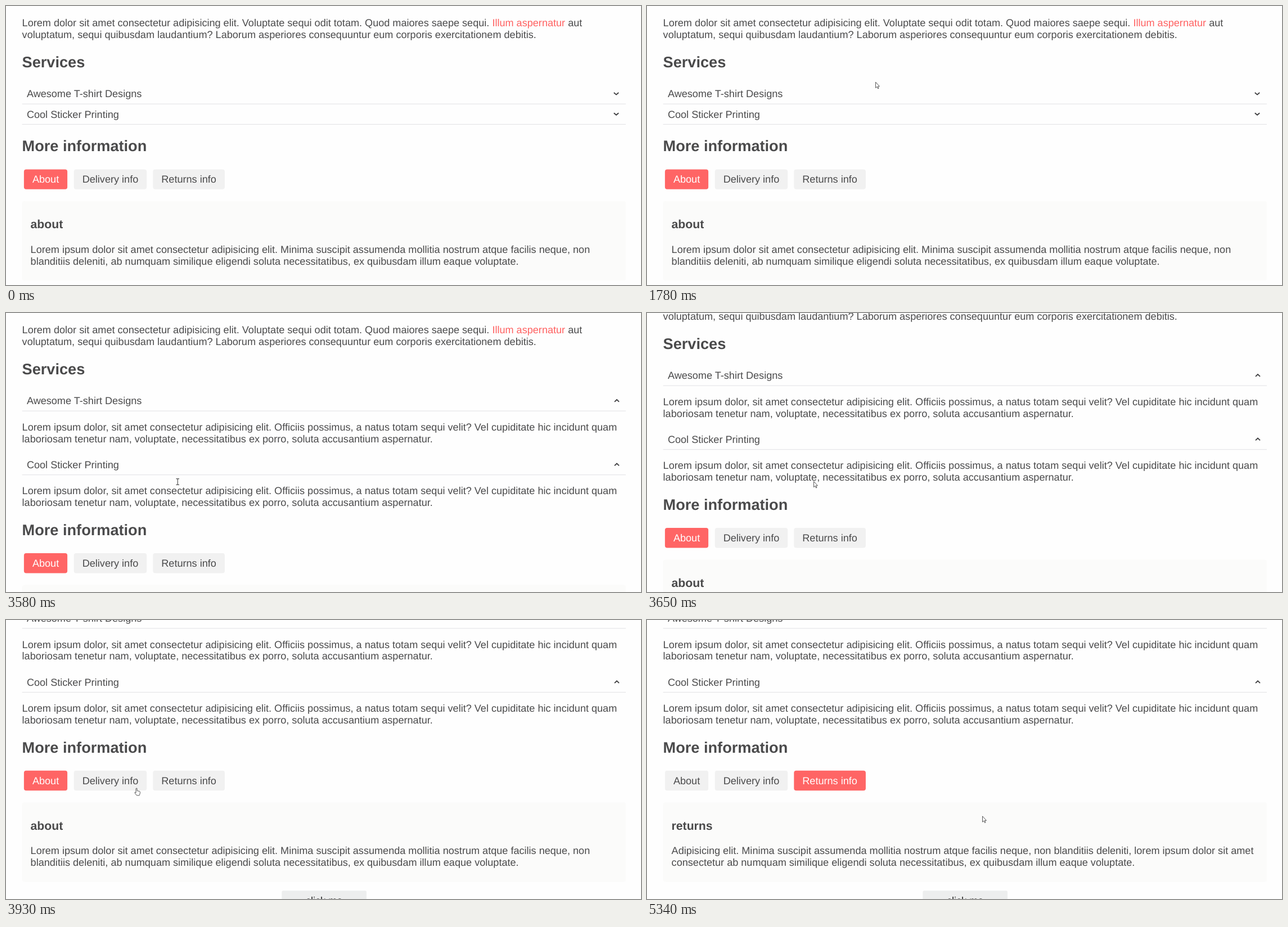
Recreate the animation shown at these times as an HTML page. Size 1129 by 496 pixels, loop 5.41 s.

```html
<!DOCTYPE html>
<html lang="en">
<head>
<meta charset="utf-8">
<title>Services and information</title>
<style>
  html, body { margin: 0; width: 100%; height: 100%; overflow: hidden; background: #fefefe; }
  svg { display: block; width: 1129px; height: 496px; }
  text {
    font: 18.1px "Liberation Sans", Arial, sans-serif;
    fill: #4a4a4b;
    text-rendering: geometricPrecision;
  }
  .h2 { font-size: 27.15px; font-weight: bold; }
  .h3 { font-size: 21.18px; font-weight: bold; }
  .link { fill: #ff6060; }
  .rule { fill: #e2e2e4; }
  .panel { fill: #fbfbfa; }
  .tab rect { fill: #f1f1f1; }
  .tab.on rect { fill: #ff6565; }
  .tab.on text { fill: #fff; }
  .chevron { fill: none; stroke: #3c3c3e; stroke-width: 1.8; }
  .pointer path { fill: #fff; stroke: #444; stroke-width: .9; stroke-linejoin: round; }
  .pointer .beam { fill: none; stroke-width: 1.1; }
</style>
</head>
<body>
<svg id="stage" viewBox="0 0 1129 496"></svg>
<script>
const LOOP = 5410;
const LEFT = 28.6, INNER = 43.6, LEADING = 20.8;

const text = (x, y, content, cls = '') => `<text x="${x}" y="${y}" class="${cls}">${content}</text>`;
const lines = (x, y, list) => list.map((line, i) => text(x, y + i * LEADING, line)).join('');
const group = (id, content) => `<g id="${id}">${content}</g>`;

const header = (id, y, label) =>
  text(36.9, y, label) +
  `<path id="${id}" class="chevron"/>` +
  `<rect class="rule" x="28.6" y="${y + 11.2}" width="1073.4" height="1"/>`;

const tab = (x, width, label) =>
  `<g class="tab"><rect x="${x}" y="290.4" width="${width}" height="35.4" rx="4"/>${text(x + 15, 314.4, label)}</g>`;

const panel = (title, list) =>
  `<g class="copy">${text(INNER, 395.4, title, 'h3')}${lines(INNER, 438.8, list)}</g>`;

const answer = [
  'Lorem ipsum dolor, sit amet consectetur adipisicing elit. Officiis possimus, a natus totam sequi velit? Vel cupiditate hic incidunt quam',
  'laboriosam tenetur nam, voluptate, necessitatibus ex porro, soluta accusantium aspernatur.'
];

const stage = document.getElementById('stage');
stage.innerHTML =
  group('page',
    lines(LEFT, 36.3, [
      'Lorem dolor sit amet consectetur adipisicing elit. Voluptate sequi odit totam. Quod maiores saepe sequi. <tspan class="link">Illum aspernatur</tspan> aut',
      'voluptatum, sequi quibusdam laudantium? Laborum asperiores consequuntur eum corporis exercitationem debitis.'
    ]) +
    text(LEFT, 108.7, 'Services', 'h2') +
    header('chevron1', 162.4, 'Awesome T-shirt Designs') +
    group('answer1', lines(LEFT, 208.8, answer)) +
    group('second', header('chevron2', 198.7, 'Cool Sticker Printing')) +
    group('answer2', lines(LEFT, 322.2, answer)) +
    group('more',
      text(LEFT, 258.3, 'More information', 'h2') +
      tab(31.9, 77.2, 'About') + tab(120.7, 129.5, 'Delivery info') + tab(261.3, 127.6, 'Returns info') +
      '<rect class="panel" x="28.6" y="346.8" width="1073.4" height="141.4" rx="4"/>' +
      panel('about', [
        'Lorem ipsum dolor sit amet consectetur adipisicing elit. Minima suscipit assumenda mollitia nostrum atque facilis neque, non',
        'blanditiis deleniti, ab numquam similique eligendi soluta necessitatibus, ex quibusdam illum eaque voluptate.'
      ]) +
      panel('delivery', [
        'Non blanditiis deleniti, ab numquam similique eligendi soluta necessitatibus, ex quibusdam illum eaque voluptate.Lorem ipsum',
        'dolor sit amet consectetur adipisicing elit. Minima suscipit assumenda mollitia nostrum atque facilis neque.'
      ]) +
      panel('returns', [
        'Adipisicing elit. Minima suscipit assumenda mollitia nostrum atque facilis neque, non blanditiis deleniti, lorem ipsum dolor sit amet',
        'consectetur ab numquam similique eligendi soluta necessitatibus, ex quibusdam illum eaque voluptate.'
      ]) +
      '<rect x="490.3" y="503.8" width="150.7" height="35" rx="2.5" fill="#edeeee"/>' +
      '<text x="565.6" y="527.5" text-anchor="middle" style="fill:#222">click me</text>'
    )
  ) +
  '<path id="tip" d="M873 0H986V12H934.5L929.5 17L924.5 12H873Z" fill="#444"/>' +
  '<g id="pointer" class="pointer">' +
    '<path d="M.5 .3V10.6L2.9 8.4L4.5 12L6 11.3L4.5 7.9H7.4Z"/>' +
    '<path d="M3 1.3q1-1.3 2 0v4l4.2.9q1.3.4 1.2 1.8l-.5 3.2-1 2.4H4.4L1 9.2Q.4 7.8 2 8l1 .8z"/>' +
    '<path class="beam" d="M.5 .6H2.4L3.2 1.2L4 .6H5.9M3.2 1V11M.5 11.4H2.4L3.2 10.8L4 11.4H5.9"/>' +
  '</g>';

const $ = id => document.getElementById(id);
const tabs = [...stage.querySelectorAll('.tab')];
const copies = [...stage.querySelectorAll('.copy')];
const shapes = [...$('pointer').children];

const ARROW = 0, HAND = 1, BEAM = 2;
// time, left, top, shape
const pointerKeys = [
  [70, 945, 90, ARROW], [280, 938, 62, ARROW], [490, 926, 30, HAND], [560, 924, 27, HAND],
  [1290, 924, 27, HAND], [1360, 912, 32, HAND], [1430, 870, 45, ARROW], [1570, 660, 88, ARROW],
  [1710, 462, 126, ARROW], [1780, 406, 135, ARROW], [1850, 378, 142, HAND], [1990, 358, 156, HAND],
  [2190, 353, 164, HAND], [2330, 353, 164, HAND], [2470, 349, 178, ARROW], [2530, 345, 197, BEAM],
  [2740, 335.3, 235, ARROW], [2810, 319, 268, HAND], [2960, 315, 282, HAND], [3160, 315, 282, HAND],
  [3400, 309, 284, HAND], [3510, 304, 292, BEAM], [3580, 302, 294, BEAM], [3650, 296, 299, ARROW],
  [3790, 280.3, 311.5, ARROW], [3860, 255, 306, HAND], [4060, 178, 284, HAND], [4200, 165.5, 280, HAND],
  [4600, 165.5, 280, HAND], [4810, 318, 281, HAND], [4940, 318, 281, HAND], [5080, 385, 300, ARROW],
  [5340, 596, 348.5, ARROW]
];
const scrollKeys = [[3580, 0], [3650, 45], [3720, 95], [3790, 126.3], [3860, 148], [3930, 159.2]];
const tipKeys = [[350, 0], [700, 1], [1360, 1], [1710, 0]];

const stepStarts = [0, 1360, 2330, 2600, 3160, 4200, 4530, 4940, 5340];
function snap(t) {
  const start = stepStarts.findLast(s => s <= t);
  return start + Math.floor((t - start) / 70) * 70;
}

function sample(keys, t) {
  const next = keys.findIndex(key => key[0] > t);
  if (next === 0) return keys[0];
  if (next < 0) return keys[keys.length - 1];
  const a = keys[next - 1], b = keys[next];
  const k = (t - a[0]) / (b[0] - a[0]);
  return a.map((v, i) => v + (b[i] - v) * k);
}

const move = (id, x, y) => $(id).setAttribute('transform', `translate(${x} ${y})`);
const show = (node, on) => { node.style.display = on ? '' : 'none'; };

function setChevron(id, y, open) {
  $(id).setAttribute('d', open ? `M1082 ${y + 2}L1086 ${y - 1.8}L1090 ${y + 2}`
                               : `M1080.8 ${y - 1.8}L1085 ${y + 1.8}L1089.2 ${y - 1.8}`);
}

function render(time) {
  const t = snap(time);
  const firstOpen = t >= 2330, secondOpen = t >= 3160;
  const active = t >= 4940 ? 2 : t >= 4410 ? 1 : 0;

  move('page', 0, -sample(scrollKeys, t)[1]);
  move('second', 0, firstOpen ? 77.3 : 0);
  move('more', 0, secondOpen ? 136.6 : firstOpen ? 77.3 : 0);
  show($('answer1'), firstOpen);
  show($('answer2'), secondOpen);
  setChevron('chevron1', 155.8, firstOpen);
  setChevron('chevron2', 192, secondOpen);
  tabs.forEach((node, i) => node.classList.toggle('on', i === active));
  copies.forEach((node, i) => show(node, i === active));
  $('tip').style.opacity = sample(tipKeys, t)[1];

  const [, x, y] = sample(pointerKeys, t);
  const shape = (pointerKeys.findLast(key => key[0] <= t) || pointerKeys[0])[3];
  move('pointer', x, y);
  show($('pointer'), t >= 70);
  shapes.forEach((node, i) => show(node, i === shape));
}

const begin = performance.now();
function tick() {
  render((performance.now() - begin) % LOOP);
  requestAnimationFrame(tick);
}
render(0);
requestAnimationFrame(tick);
</script>
</body>
</html>
```
